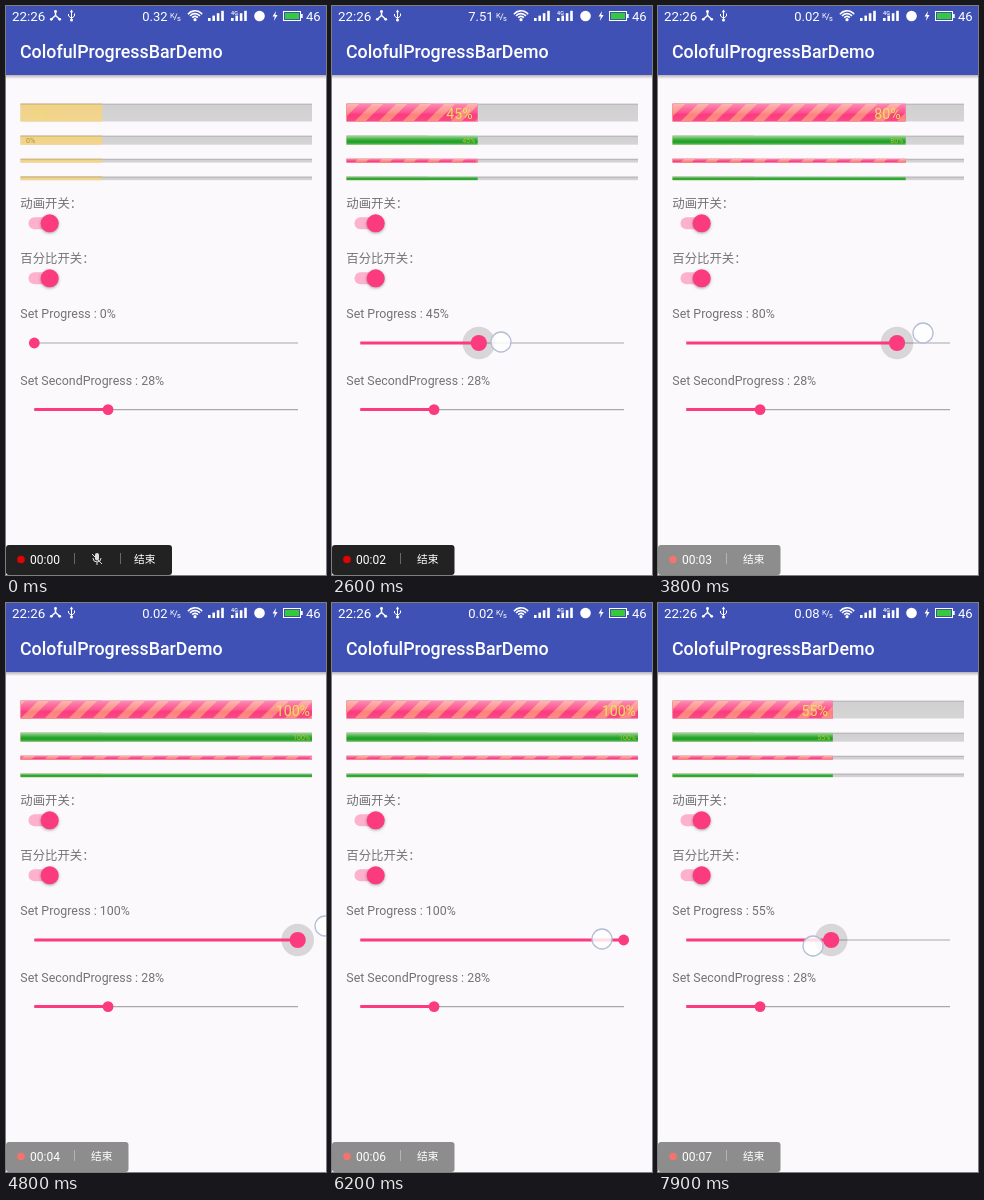
An HTML page with a canvas that plays this animation: 320x569 px, repeating every 8000 ms.

```html
<!DOCTYPE html>
<html lang="zh">
<head>
<meta charset="utf-8">
<title>Progress bars</title>
<style>
html, body { margin: 0; width: 100%; height: 100%; overflow: hidden; background: #fbf9fc; }
canvas { display: block; width: 320px; height: 569px; }
</style>
</head>
<body>
<canvas id="stage"></canvas>
<script>
const LOOP = 8000, STEP = 100;
const PINK = '#fb3b7e', GREY = '#737373', WHITE = '#fff';
const LATIN = 'Roboto, "Noto Sans CJK SC", "Noto Sans CJK", sans-serif';
const CJK = '"Noto Sans CJK SC", "Noto Sans CJK", sans-serif';
const BAR_X = 14.5, BAR_W = 291.5, SECOND = 28;

const canvas = document.getElementById('stage');
const ratio = window.devicePixelRatio || 1;
canvas.width = Math.round(320 * ratio);
canvas.height = Math.round(569 * ratio);
const c = canvas.getContext('2d');
c.scale(ratio, ratio);

// Keys: [time, value, value...]
const progressKeys = [[1300, 0], [1600, 8], [2600, 45], [3800, 80], [4500, 96], [4700, 100],
  [6300, 100], [7200, 77], [7900, 55], [8000, 52]];
const dragOut = [[1000, 40, 337], [1300, 50, 337], [1600, 69, 336], [2600, 169, 336],
  [3800, 265, 327], [4500, 307, 324], [4800, 319, 323]];
const dragBack = [[6100, 271, 336], [6200, 270, 336], [6300, 266, 336.5], [7200, 212, 340],
  [7900, 155, 343], [8000, 147, 343]];

function at(keys, t) {
  if (t <= keys[0][0]) return keys[0].slice(1);
  for (let i = 1; i < keys.length; i++) {
    const a = keys[i - 1], b = keys[i];
    if (t <= b[0]) {
      const k = (t - a[0]) / (b[0] - a[0]);
      return a.slice(1).map((v, j) => v + (b[j + 1] - v) * k);
    }
  }
  return keys[keys.length - 1].slice(1);
}

function rect(x, y, w, h, fill) {
  c.fillStyle = fill;
  c.fillRect(x, y, w, h);
}
function disc(x, y, r, fill) {
  c.fillStyle = fill;
  c.beginPath();
  c.arc(x, y, r, 0, 7);
  c.fill();
}
function line(color, width, ...points) {
  c.strokeStyle = color;
  c.lineWidth = width;
  c.beginPath();
  points.forEach(([x, y], i) => i ? c.lineTo(x, y) : c.moveTo(x, y));
  c.stroke();
}
function text(s, x, y, size, fill, { align = 'left', weight = 400, family = LATIN } = {}) {
  c.font = `${weight} ${size}px ${family}`;
  c.textAlign = align;
  c.fillStyle = fill;
  c.fillText(s, x, y);
}
function shade(y, h, ...stops) {
  const g = c.createLinearGradient(0, y, 0, y + h);
  stops.forEach(([p, color]) => g.addColorStop(p, color));
  return g;
}
function poly(fill, ...points) {
  c.fillStyle = fill;
  c.beginPath();
  points.forEach(p => c.lineTo(...p));
  c.fill();
}

function signal(x) {
  for (let i = 0; i < 4; i++) rect(x + i * 4.4, 12 - i * 2.4, 2.6, 3 + i * 2.4, WHITE);
}

function statusBar(t) {
  rect(0, 0, 320, 69, '#3f51b5');
  rect(0, 69, 320, 4, shade(69, 4, [0, 'rgba(0,0,0,.28)'], [1, 'rgba(0,0,0,0)']));
  text('22:26', 6, 15, 13.4, WHITE);

  line(WHITE, 1.5, [49.5, 5], [49.5, 9.5], [45, 13.5]);
  line(WHITE, 1.5, [49.5, 9.5], [54, 13.5]);
  [[49.5, 5.5], [45.3, 13.3], [53.7, 13.3]].forEach(p => disc(...p, 1.4, WHITE));
  line(WHITE, 1, [65.5, 5], [65.5, 14]);
  line(WHITE, 1, [62.5, 8], [62.5, 10], [65.5, 12.3], [68.5, 10], [68.5, 7.5]);
  poly(WHITE, [65.5, 3.5], [63.8, 6.3], [67.2, 6.3]);
  disc(65.5, 14, 1.5, WHITE);

  const speed = t < 700 ? '0.32' : t < 3700 ? '7.51' : t < 6700 ? '0.02' : '0.08';
  text(speed, 161.5, 15, 13, WHITE, { align: 'right' });
  text('K', 164, 11.5, 7.5, WHITE);
  line(WHITE, .8, [168.3, 14], [171, 7.5]);
  text('s', 171, 15, 7.5, WHITE);

  c.strokeStyle = WHITE;
  c.lineWidth = 1.6;
  for (const r of [3.6, 6.4, 9.2]) {
    c.beginPath();
    c.arc(189, 14, r, -Math.PI * .78, -Math.PI * .22);
    c.stroke();
  }
  disc(189, 13.7, 1.6, WHITE);
  signal(202);
  signal(225);
  text('4G', 225, 9, 5.5, WHITE, { weight: 500 });
  disc(253.5, 10, 5.3, WHITE);
  poly(WHITE, [270, 5], [266.5, 10.6], [268.8, 10.6], [267.8, 15], [271.6, 9], [269.3, 9]);
  c.strokeStyle = WHITE;
  c.lineWidth = 1;
  c.strokeRect(277.5, 5.5, 17, 9);
  rect(295, 8, 1.7, 4, WHITE);
  rect(279, 7, 14, 6, '#35c93c');
  text('46', 300, 15, 13, WHITE);
  text('ColofulProgressBarDemo', 14, 51.5, 17.8, WHITE, { weight: 500 });
}

function stripes(y, h, end, t) {
  const period = 24, shift = t * .04 % period;
  c.save();
  c.beginPath();
  c.rect(BAR_X, y, end - BAR_X, h);
  c.clip();
  for (let x = BAR_X - 2 * period + shift; x < end + period; x += period)
    poly('#fd837c', [x, y + h], [x + 11, y + h], [x + 11 + h, y], [x + h, y]);
  c.restore();
}

function bar(y, h, percent, t, pink) {
  const end = BAR_X + BAR_W * percent / 100;
  const edge = Math.min(.45, 1.6 / h);
  rect(BAR_X, y, BAR_W, h, shade(y, h, [0, '#aaa5a5'], [edge, '#d1d0d1'], [1, '#d6d5d6']));
  rect(BAR_X, y, BAR_W * SECOND / 100, h,
    shade(y, h, [0, '#c5a967'], [edge, '#f0d28a'], [1, '#f3d68e']));
  if (percent <= 0) return;
  if (pink) {
    rect(BAR_X, y, end - BAR_X, h, PINK);
    stripes(y, h, end, t);
    rect(BAR_X, y, end - BAR_X, h, shade(y, h, [0, 'rgba(255,255,255,.42)'],
      [.5, 'rgba(255,255,255,.12)'], [.62, 'rgba(255,255,255,0)'], [1, 'rgba(255,255,255,.08)']));
  } else {
    rect(BAR_X, y, end - BAR_X, h,
      shade(y, h, [0, '#a5d8a2'], [.45, '#35ad38'], [.7, '#1c9c22'], [1, '#62bd62']));
  }
}

function barLabel(percent, y, size, gap, min, fill) {
  const end = BAR_X + BAR_W * percent / 100 - (percent === 100 ? 2 : gap);
  c.font = `400 ${size}px ${LATIN}`;
  const s = percent + '%';
  text(s, Math.max(min, end - c.measureText(s).width), y, size, fill);
}

function toggle(y) {
  c.fillStyle = '#fdb1ca';
  c.beginPath();
  c.roundRect(22.5, y - 6, 28, 12, 6);
  c.fill();
  c.save();
  c.shadowColor = 'rgba(0,0,0,.35)';
  c.shadowBlur = 3 * ratio;
  c.shadowOffsetY = ratio;
  disc(43.7, y, 9, PINK);
  c.restore();
}

function seek(y, percent, press) {
  const x = 28.3 + 263.4 * percent / 100;
  line('#a9a9a9', 1.2, [28.3, y], [292, y]);
  if (press) disc(x, y, 8 + 8.3 * press, 'rgba(0,0,0,.14)');
  line(PINK, 3, [28.3, y], [x, y]);
  disc(x, y, 5.4 + 2.7 * press, PINK);
}

function recorder(t) {
  const wide = t < 500, faded = t >= 3300, width = wide ? 166 : 122.5;
  c.fillStyle = faded ? '#8e8d8e' : '#232223';
  c.beginPath();
  c.roundRect(0, 539, width, 30, 3);
  c.fill();
  disc(15, 553.5, 3.8, faded ? '#f4736e' : '#e00404');
  text('00:0' + Math.floor(t / 1000), 24, 557.5, 12, WHITE);
  const rule = faded ? '#b5b4b5' : '#6a696a';
  line(rule, 1, [68.5, 547], [68.5, 558]);
  if (wide) {
    line(rule, 1, [114.5, 547], [114.5, 558]);
    c.fillStyle = '#ddd';
    c.beginPath();
    c.roundRect(89, 547, 4, 7.5, 2);
    c.fill();
    c.strokeStyle = '#ddd';
    c.lineWidth = 1;
    c.beginPath();
    c.arc(91, 552, 4, 0, Math.PI);
    c.stroke();
    line('#ddd', 1, [91, 556], [91, 559]);
    line('#ddd', 1, [86, 548], [96, 558]);
  }
  text('结束', wide ? 128 : 85, 557, 10.7, WHITE, { family: CJK });
}

function touch([x, y]) {
  disc(x, y, 10, 'rgba(255,255,255,.82)');
  c.strokeStyle = '#b3bdd6';
  c.lineWidth = 1.3;
  c.beginPath();
  c.arc(x, y, 10, 0, 7);
  c.stroke();
}

function pressAt(t) {
  const ramp = (from, to) => Math.max(0, Math.min(1, (t - from) / 200, (to - t) / 200));
  return Math.max(ramp(1100, 5200), ramp(6200, 8400));
}

function draw(t) {
  const percent = Math.round(at(progressKeys, t)[0]);
  rect(0, 0, 320, 569, '#fbf9fc');
  statusBar(t);

  bar(97.7, 17.8, percent, t, true);
  bar(129.7, 9, percent, t, false);
  bar(152.8, 3.8, percent, t, true);
  bar(170.6, 3.6, percent, t, false);
  barLabel(percent, 113, 14.2, 5, 27, percent ? '#eee05a' : '#eed777');
  barLabel(percent, 137, 7, 2.5, percent ? 22 : 20, percent ? '#b9c436' : '#a98f35');

  text('动画开关：', 14.3, 201.7, 12.4, GREY, { family: CJK });
  toggle(217.3);
  text('百分比开关：', 14.3, 256.7, 12.4, GREY, { family: CJK });
  toggle(272.3);
  text(`Set Progress : ${percent}%`, 14.3, 312, 12.4, GREY);
  seek(337, percent, pressAt(t));
  text(`Set SecondProgress : ${SECOND}%`, 14.3, 379, 12.4, GREY);
  seek(403.6, SECOND, 0);

  if (t >= 1000 && t < 5000) touch(at(dragOut, t));
  else if (t >= 6100) touch(at(dragBack, t));
  recorder(t);
}

let start;
function tick(now) {
  start ??= now;
  draw(Math.floor((now - start) % LOOP / STEP) * STEP);
  requestAnimationFrame(tick);
}
draw(0);
requestAnimationFrame(tick);
</script>
</body>
</html>
```
